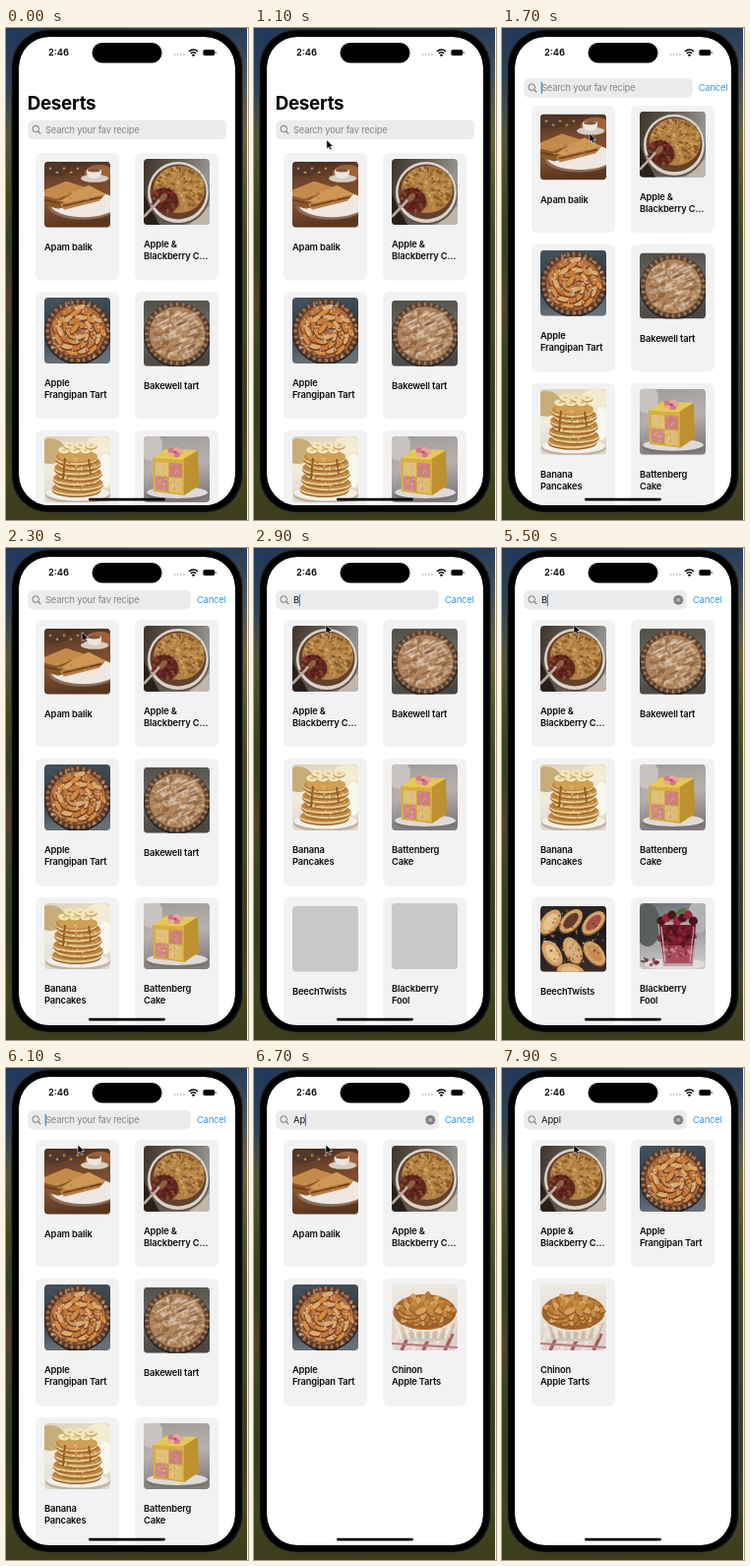
Recreate the animation shown at these times as an HTML page with a canvas. Size 246 by 500 pixels, loop 8 s.

```html
<!DOCTYPE html>
<html lang="en">
<head>
<meta charset="utf-8">
<title>Recipe search</title>
<style>
  html, body { margin: 0; width: 100%; height: 100%; overflow: hidden; background: #2b3020; }
  canvas { display: block; width: 246px; height: 500px; }
</style>
</head>
<body>
<canvas id="stage"></canvas>
<script>
const W = 246, H = 500, LOOP = 8000, STEP = 200, THUMB = 67;
const canvas = document.getElementById('stage');
const ratio = window.devicePixelRatio || 1;
canvas.width = W * ratio;
canvas.height = H * ratio;
const c = canvas.getContext('2d');
c.scale(ratio, ratio);

const lerp = (a, b, p) => a + (b - a) * p;
const clamp = v => Math.max(0, Math.min(1, v));

function random(seed) {
  return () => (seed = (seed * 16807) % 2147483647) / 2147483647;
}

function box(x, y, w, h, r, fill) {
  c.beginPath();
  c.roundRect(x, y, w, h, r);
  c.fillStyle = fill;
  c.fill();
}

function oval(x, y, rx, ry, fill, turn = 0) {
  c.beginPath();
  c.ellipse(x, y, rx, ry, turn, 0, Math.PI * 2);
  c.fillStyle = fill;
  c.fill();
}

function poly(points, fill) {
  c.beginPath();
  for (let i = 0; i < points.length; i += 2) c.lineTo(points[i], points[i + 1]);
  c.closePath();
  c.fillStyle = fill;
  c.fill();
}

function line(x1, y1, x2, y2, color, width) {
  c.beginPath();
  c.moveTo(x1, y1);
  c.lineTo(x2, y2);
  c.strokeStyle = color;
  c.lineWidth = width;
  c.stroke();
}

function gradient(x1, y1, x2, y2, ...colors) {
  const g = c.createLinearGradient(x1, y1, x2, y2);
  colors.forEach((color, i) => g.addColorStop(i / (colors.length - 1), color));
  return g;
}

function text(str, x, y, weight, size, color, spacing = 0) {
  c.font = `${weight} ${size}px Inter, sans-serif`;
  c.letterSpacing = spacing + 'px';
  c.fillStyle = color;
  c.fillText(str, x, y);
}

// Scatters small crumbs evenly over an ellipse.
function crumbs(seed, count, x, y, rx, ry, size, colors) {
  const rnd = random(seed);
  c.globalAlpha = 0.7;
  for (let i = 0; i < count; i++) {
    const a = rnd() * Math.PI * 2, d = Math.sqrt(rnd());
    oval(x + Math.cos(a) * d * rx, y + Math.sin(a) * d * ry,
      size * (0.5 + rnd()), size * (0.4 + rnd() * 0.6), colors[i % colors.length], a);
  }
  c.globalAlpha = 1;
}

function backdrop(...colors) {
  box(0, 0, THUMB, THUMB, 0, gradient(0, 0, 10, THUMB, ...colors));
}

// Pastry rim with evenly pressed notches.
function crust(x, y, r, dark, light) {
  oval(x, y + 1, r + 1, r, '#2a2422');
  oval(x, y, r, r - 1, dark);
  for (let i = 0; i < 32; i++) {
    const a = i * Math.PI / 16;
    oval(x + Math.cos(a) * (r - 2), y + Math.sin(a) * (r - 3), 2.2, 1.4, light, a);
  }
}

/* Dishes, each painted in a 67 px square */

function foldedPancake() {
  backdrop('#3d2a21', '#70452b', '#80502e', '#5b361f');
  oval(56, 12, 15, 9, '#9d6238');
  oval(10, 8, 15, 7, '#51372a');
  for (let i = 0; i < 5; i++) oval(6 + i * 7, 7 + (i % 2) * 4, 1.4, 1.2, '#bd8142');
  oval(51, 17, 14, 4, '#d8cdc4');
  box(43, 8, 15, 9, [1, 1, 6, 6], '#ece5df');
  oval(50.5, 9, 6.5, 1.7, '#7e5338');
  oval(39, 45, 35, 14, '#8b6c58');
  oval(40, 43, 34, 13.5, '#eee7e2');
  poly([0, 30, 22, 20, 58, 30, 60, 36, 14, 48, 0, 44], '#8d5629');
  poly([0, 29, 22, 20, 44, 27, 12, 38, 0, 35], '#c58a4b');
  poly([34, 29, 45, 24, 62, 33, 56, 40, 20, 49, 16, 44], '#b97d40');
  poly([34, 29, 45, 24, 62, 33, 24, 42, 16, 40], '#cf9856');
  line(0, 39, 15, 42, '#68401f', 2);
  line(19, 45, 58, 36, '#6d4120', 1.8);
  crumbs(5, 45, 30, 36, 25, 8, 0.8, ['#dba965', '#8f6032', '#ce934f']);
}

function crumble() {
  box(0, 0, THUMB, THUMB, 0, gradient(0, 0, THUMB, 16, '#3f352c', '#655c52', '#979795'));
  poly([0, 36, 16, 67, 0, 67], '#2a201b');
  poly([67, 48, 67, 67, 46, 67], '#beb7ac');
  oval(35, 36, 32, 31, '#605449');
  oval(35, 34, 31, 31, '#d9d3ca');
  oval(35, 33.5, 28.5, 28, '#65402b');
  oval(36, 31, 26, 24, '#b28043');
  crumbs(17, 220, 36, 30, 25, 22, 1.7, ['#c79a56', '#966229', '#d5aa67', '#744a25']);
  oval(22, 42, 14, 12, '#59271e', 0.6);
  crumbs(9, 48, 22, 42, 14, 12, 2, ['#842823', '#3f1715', '#a2683a', '#6a1c1c']);
  line(0, 59, 18, 40, '#b7aaa0', 2.6);
  oval(20, 39, 5, 3, '#8e6042', -0.8);
}

function appleTart() {
  backdrop('#46535d', '#313e48', '#667078');
  crust(34, 34, 33, '#593a2a', '#a47050');
  oval(34, 34, 28, 27, '#a76a3b');
  const rnd = random(19);
  for (let i = 0; i < 34; i++) {
    const a = i * 2.4, d = 25 * Math.sqrt(1 - i / 34);
    const x = 34 + Math.cos(a) * d, y = 34 + Math.sin(a) * d, turn = a + 1.1 + rnd() * 0.5;
    oval(x, y + 1, 6.6, 3.1, '#6f3e24', turn);
    oval(x, y, 6.2, 2.5, ['#d58c43', '#c6783a', '#ddaa6e'][i % 3], turn);
  }
  crumbs(23, 150, 34, 34, 31, 31, 1.1, ['#ddd0c4', '#c6a383', '#704329']);
}

function almondTart() {
  backdrop('#514e49', '#6c6962', '#4a4743');
  crust(34, 34, 33, '#5b412f', '#997256');
  oval(34, 34, 28.5, 27.5, '#ac815b');
  crumbs(31, 220, 34, 34, 27, 26, 2, ['#c9a581', '#926442', '#b68d67', '#d4bca1']);
  const rnd = random(83);
  c.globalAlpha = 0.55;
  for (let i = 0; i < 34; i++) {
    oval(12 + rnd() * 44, 14 + rnd() * 40, 5, 1.1, i % 3 ? '#e6dacd' : '#79543a', -0.45);
  }
  c.globalAlpha = 1;
}

function pancakeStack() {
  backdrop('#ded2ba', '#f1ece0', '#e0d6c6');
  oval(6, 15, 15, 13, '#c9ad78');
  oval(56, 9, 14, 9, '#f4ecd2');
  oval(62, 35, 7, 17, '#faf7ef');
  oval(34, 60, 33, 8, '#bbb0a3');
  oval(34, 58, 32, 7.5, '#f3efe8');
  for (let i = 0; i < 7; i++) {
    const y = 55 - i * 5.2, x = 34 + (i % 2 ? 1.4 : -1.4), r = 25 - i * 0.6;
    oval(x, y, r, 7, '#99642d');
    oval(x, y - 1.2, r, 6.6, '#e5c98d');
    oval(x, y - 2.8, r - 0.5, 6.2, '#bf8740');
  }
  oval(34, 20, 20, 5.8, '#d2a054');
  for (let i = 0; i < 6; i++) {
    const x = 20 + i * 5.5, y = 14 - (i % 2) * 5;
    oval(x, y + 1.3, 6, 3.6, '#bd9a59');
    oval(x, y, 5.8, 3.4, '#f3e5ba');
    oval(x, y, 2, 1, '#d9bd7c');
  }
  line(21, 22, 19, 43, '#92581f', 2);
  line(45, 23, 47, 38, '#92581f', 1.8);
  crumbs(43, 70, 34, 38, 23, 18, 1, ['#ecd59d', '#a26a2d', '#c98f42']);
}

function checkerCake() {
  backdrop('#a09b99', '#b7b1ae', '#827d7c');
  oval(7, 10, 12, 15, '#c8c2bf');
  oval(34, 59, 32, 7, '#787473');
  oval(34, 57, 31, 6, '#dedad7');
  poly([9, 23, 22, 13, 55, 14, 40, 25], '#e5c955');
  poly([39, 24, 55, 14, 56, 50, 41, 60], '#bd912f');
  poly([9, 22, 41, 24, 41, 60, 10, 56], '#d6ad42');
  poly([12, 26, 25, 27, 25, 41, 12, 39], '#dfc17b');
  poly([26, 27, 39, 28, 39, 42, 26, 41], '#cd807c');
  poly([12, 40, 25, 42, 25, 56, 12, 54], '#d08680');
  poly([26, 42, 39, 43, 39, 58, 26, 56], '#dcbc70');
  crumbs(49, 80, 26, 42, 13, 14, 0.8, ['#ead39c', '#dfa19b', '#b78958']);
  for (let i = 0; i < 5; i++) {
    const a = i * Math.PI * 0.4;
    oval(32 + Math.cos(a) * 5, 16 + Math.sin(a) * 3, 3.5, 2.5, i % 2 ? '#d77780' : '#e9a5a1');
  }
  oval(32, 16, 2, 1.5, '#b6565d');
}

function friedPastries() {
  backdrop('#302827', '#1c1b1f', '#372a27');
  const pastry = (x, y, turn, top) => {
    oval(x, y + 1, 15, 9, '#7b4d2d', turn);
    oval(x, y, 14.2, 8.5, '#d2a268', turn);
    oval(x, y, 10, 5.2, top, turn);
  };
  pastry(10, 16, -0.9, '#e4c38e');
  pastry(31, 15, -0.8, '#633c2b');
  pastry(54, 17, -0.8, '#a54d42');
  pastry(12, 48, 1, '#e5c28c');
  pastry(33, 45, 1.1, '#d8b080');
  pastry(55, 48, 0.9, '#c78b55');
  pastry(31, 67, 0.2, '#e0bb84');
  crumbs(57, 90, 34, 34, 31, 30, 1.2, ['#ecd1a4', '#9b673b', '#5a3421']);
}

function berryGlass() {
  backdrop('#6d7475', '#969a9b', '#cdc8c7');
  oval(8, 22, 13, 22, '#585f5d');
  oval(60, 13, 11, 17, '#b2b4b3');
  oval(36, 62, 31, 6, '#e1dbda');
  poly([18, 19, 59, 19, 54, 64, 24, 64], '#bda3a8');
  poly([20, 22, 57, 22, 55, 45, 22, 45], '#741c2b');
  poly([22, 43, 55, 43, 53, 61, 25, 61], '#a94d5c');
  crumbs(61, 42, 38, 34, 17, 11, 3, ['#591321', '#98293a', '#3d121b']);
  crumbs(67, 26, 39, 50, 14, 8, 2.2, ['#cb8490', '#7c2b39']);
  for (let i = 0; i < 7; i++) {
    oval(22 + i * 5.4, 18 - (i % 3) * 3, 4.6, 4.4, i % 2 ? '#9c2635' : '#451721');
  }
  oval(42, 8, 6, 2.5, '#577047', -0.5);
  line(22, 24, 26, 60, '#dbc7c9', 1.1);
  line(55, 24, 51, 60, '#dac4c7', 0.9);
  crumbs(71, 8, 11, 60, 9, 4, 2.4, ['#84283a', '#551e2b']);
}

function dishPie() {
  backdrop('#efebe3', '#e5dfd5', '#ded1ca');
  for (let i = 0; i < 8; i++) line(i * 11 - 12, 67, i * 11 - 4, 50, i % 2 ? '#ece0db' : '#a4605f', 3.5);
  line(0, 60, 67, 64, '#b57b79', 2);
  poly([1, 32, 66, 32, 59, 54, 9, 54], '#e1d6c8');
  oval(34, 53, 25, 5, '#d2c5b5');
  for (let i = 0; i < 14; i++) line(4 + i * 4.6, 39, 10 + i * 3.7, 55, i % 2 ? '#c4b5a2' : '#f3eee6', 1.5);
  oval(33.5, 30, 33, 18, '#eadfce');
  oval(33.5, 28, 32, 18, '#a2632b');
  const rnd = random(77);
  for (let i = 0; i < 44; i++) {
    const a = i * 2.4, d = Math.sqrt(1 - i / 44), turn = a + rnd();
    const x = 33.5 + Math.cos(a) * d * 26, y = 26 + Math.sin(a) * d * 13;
    oval(x, y + 1, 7, 3.5, '#92592a', turn);
    oval(x, y, 6.4, 3, ['#c78b45', '#d6a35a', '#b97b36'][i % 3], turn);
  }
}

const recipes = [
  { name: 'Apam balik', paint: foldedPancake },
  { name: 'Apple &\nBlackberry C…', paint: crumble },
  { name: 'Apple\nFrangipan Tart', paint: appleTart },
  { name: 'Bakewell tart', paint: almondTart },
  { name: 'Banana\nPancakes', paint: pancakeStack },
  { name: 'Battenberg\nCake', paint: checkerCake },
  { name: 'BeechTwists', paint: friedPastries, loaded: 3100 },
  { name: 'Blackberry\nFool', paint: berryGlass, loaded: 3100 },
  { name: 'Chinon\nApple Tarts', paint: dishPie }
];

const FOCUS = 1400;
const typing = [
  [FOCUS, ''], [2900, 'B'], [3100, 'Ba'], [3300, 'Ban'], [3500, 'Bana'], [3700, 'Banan'],
  [4700, 'Bana'], [4900, 'Ban'], [5100, 'Ba'], [5300, 'B'], [5700, ''],
  [6300, 'A'], [6500, 'Ap'], [7100, 'App'], [7300, 'Appl']
];
const pointerPath = [[500, -8, 150], [1300, 89, 107], [1900, 89, 107], [2500, 73, 78], [LOOP, 73, 78]];

function wallpaper() {
  box(0, 0, W, H, 0, gradient(0, 0, 0, H,
    '#22385a', '#2f4258', '#55553a', '#474822', '#363f1f', '#52442a', '#39431f', '#343c1c', '#42441f', '#3b3d1b'));
  box(W / 2, 0, W / 2, H, 0, gradient(0, 0, 0, H,
    '#263c5c', '#4b5456', '#6a6636', '#545526', '#434a22', '#454821', '#3c4520', '#3b401d', '#45461f', '#3b3d1b'));
  box(W - 1, 0, 1, H, 0, '#f4f4f2');
}

function phone() {
  box(5, 1, 236, 492, 38, '#343638');
  box(6, 2, 234, 490, 37, '#0c0c0d');
  box(7.5, 3.5, 231, 487, 36, '#000');
}

function statusBar() {
  text('2:46', 43, 28.4, 600, 9.4, '#000');
  box(87.5, 15, 71, 20.5, 10.25, '#000');
  for (let i = 0; i < 4; i++) oval(171.5 + i * 3.1, 27, 0.9, 0.9, '#b9b9bc');
  c.strokeStyle = '#000';
  c.lineWidth = 1.5;
  for (const r of [3.6, 6.2]) {
    c.beginPath();
    c.arc(190.5, 28.3, r, -Math.PI * 0.76, -Math.PI * 0.24);
    c.stroke();
  }
  oval(190.5, 27.6, 1.3, 1.2, '#000');
  box(200.3, 22, 12, 6, 2, '#000');
  box(212.9, 23.8, 1, 2.4, 0.5, '#777');
}

function searchField(t, p, query, since) {
  const mid = lerp(103.2, 52.8, p), right = lerp(224, 188, p);
  box(22.3, mid - 9.8, right - 22.3, 19.6, 5.5, '#ebebed');
  c.strokeStyle = '#77777b';
  c.lineWidth = 1;
  c.beginPath();
  c.arc(30.2, mid - 0.7, 3.3, 0, Math.PI * 2);
  c.stroke();
  line(32.6, mid + 1.7, 35.3, mid + 4.4, '#77777b', 1.1);

  if (query) text(query, 40, mid + 3.4, 400, 9.4, '#111', -0.05);
  else text('Search your fav recipe', 40, mid + 3.4, 400, 9.3, '#838387', -0.17);

  if (t >= FOCUS && since % 1000 < 500) {
    const x = 40 + (query ? c.measureText(query).width : 0);
    box(x - 0.3, mid - 6, 1.2, 12, 0.6, '#2f80e0');
  }
  if (query && t > 2900) {
    oval(179.3, mid, 4.9, 4.9, '#808084');
    line(177.5, mid - 1.8, 181.1, mid + 1.8, '#ebebed', 1);
    line(181.1, mid - 1.8, 177.5, mid + 1.8, '#ebebed', 1);
  }
  if (p > 0) {
    c.globalAlpha = clamp(p * 1.2);
    text('Cancel', right + 5.9, mid + 3.4, 400, 9.4, '#3c97e4', -0.15);
    c.globalAlpha = 1;
  }
}

function card(recipe, x, y, t) {
  const lines = recipe.name.split('\n');
  const shift = lines.length > 1 ? 0 : 2.8;
  box(x, y, 85, 129.5, 6, '#f2f2f3');
  c.save();
  c.translate(x + 9, y + 6 + shift);
  c.beginPath();
  c.roundRect(0, 0, THUMB, THUMB, 4);
  c.clip();
  if (t < (recipe.loaded || 0)) box(0, 0, THUMB, THUMB, 0, '#c8c8cb');
  else recipe.paint();
  c.restore();
  lines.forEach((str, i) => text(str, x + 9, y + 96 + shift + i * 12.3, 600, 9.3, '#0b0b0c', -0.14));
}

function pointer(t) {
  const i = pointerPath.findIndex(k => k[0] > t);
  if (i < 1) return;
  const [t0, x0, y0] = pointerPath[i - 1], [t1, x1, y1] = pointerPath[i];
  const p = (t - t0) / (t1 - t0), e = p * p * (3 - 2 * p);
  c.save();
  c.translate(lerp(x0, x1, e), lerp(y0, y1, e));
  poly([0, 0, 0, 9, 2.1, 7.2, 3.6, 10.3, 5.2, 9.6, 3.8, 6.6, 6.6, 6.4], '#000');
  c.strokeStyle = '#fff';
  c.lineWidth = 0.6;
  c.stroke();
  c.restore();
}

function draw(t) {
  const last = typing.filter(k => k[0] <= t).pop() || [0, ''];
  const query = last[1];
  const x = clamp((t - FOCUS) / 500), p = x * (2 - x);

  wallpaper();
  phone();
  c.save();
  c.beginPath();
  c.roundRect(13, 9, 220, 476, 31);
  c.clip();
  c.fillStyle = '#fff';
  c.fill();

  const top = lerp(127, 73, Math.pow(p, 0.65));
  recipes.filter(r => r.name.includes(query)).forEach((r, i) => {
    const y = top + Math.floor(i / 2) * 141;
    if (y < H) card(r, i % 2 ? 131 : 30, y, t);
  });

  c.globalAlpha = clamp(1 - p * 1.8);
  text('Deserts', 21.7, lerp(83.4, 45, p), 700, 18.8, '#000', -0.3);
  c.globalAlpha = 1;
  searchField(t, p, query, t - last[0]);
  statusBar();
  box(84, 477.7, 78, 2.8, 1.4, '#000');
  c.restore();
  pointer(t);
}

let shown = -1;
const start = performance.now();
function tick() {
  const step = Math.floor((((performance.now() - start) % LOOP) + STEP / 2) / STEP);
  if (step !== shown) {
    shown = step;
    draw(Math.max(0, step * STEP - STEP / 2));
  }
  requestAnimationFrame(tick);
}
tick();
</script>
</body>
</html>
```
